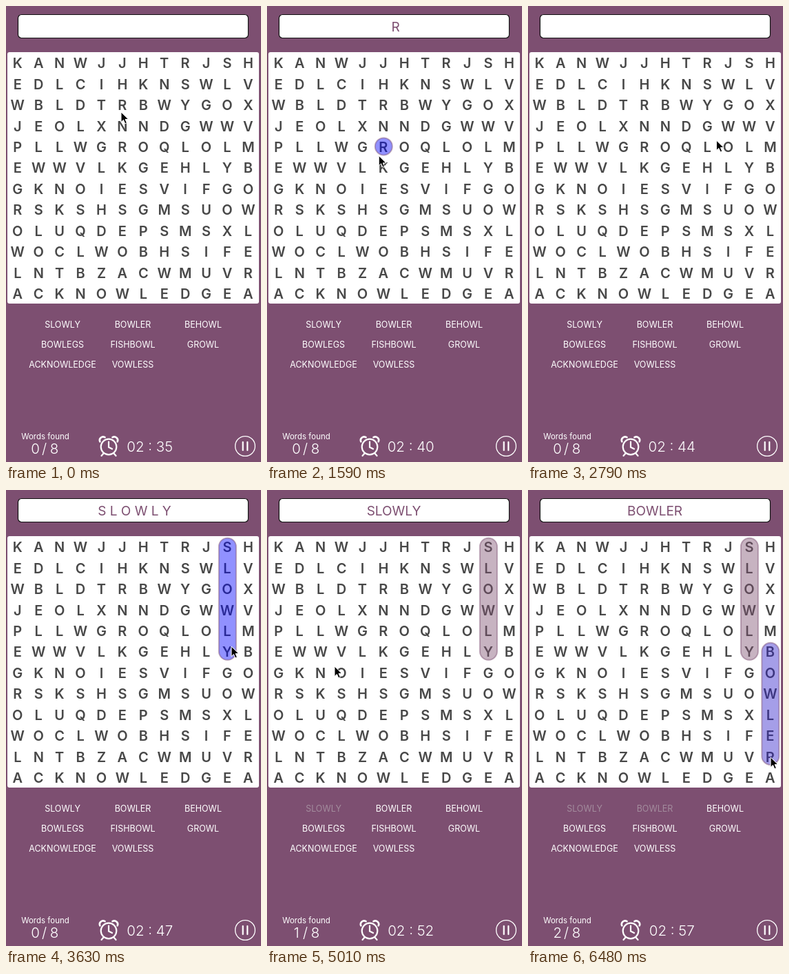
An HTML page that plays this animation: 370x662 px, repeating every 6510 ms.

```html
<!DOCTYPE html>
<html lang="en">
<head>
<meta charset="utf-8">
<title>Word search</title>
<style>
  html, body { margin: 0; width: 100%; height: 100%; overflow: hidden; background: #7d4f71; }
  svg { display: block; width: 370px; height: 662px; font-family: Inter, "Open Sans", sans-serif; }
  text { text-anchor: middle; fill: #fff; }
  #letters text { font-size: 20px; font-weight: 600; fill: #484848; }
  #typed { font-size: 19px; fill: #7d4f71; }
  #words text { font-size: 12.5px; }
  #words .found { fill: #a38c9d; }
  #pills rect { stroke: rgba(125, 79, 113, .45); stroke-width: 2; }
  .label { font-size: 11.5px; }
  .num { font-size: 20.5px; font-weight: 300; }
  .icon { fill: none; stroke: #fff; stroke-linecap: round; }
</style>
</head>
<body>
<svg viewBox="0 0 370 662">
  <rect width="370" height="662" fill="#7d4f71"/>
  <rect x="17.5" y="12.5" width="334" height="34" rx="5" fill="#fff" stroke="#111" stroke-width="1.2"/>
  <text id="typed" y="36.8"></text>
  <rect x="2" y="67" width="365" height="365" rx="3" fill="#fff"/>
  <g id="letters"></g>
  <g id="pills"></g>
  <g id="words"></g>
  <text class="label" x="57" y="629">Words found</text>
  <g class="num">
    <text id="score" x="42.7" y="650"></text>
    <text x="55.5" y="650">/</text>
    <text x="70" y="650">8</text>
    <text id="clock" x="208.7" y="647"></text>
  </g>
  <g class="icon" stroke-width="2.2">
    <circle cx="149" cy="640" r="11.3"/>
    <path d="M149 632.5V640.5L154 643M141.5 649.5L138.5 653M156.5 649.5L159.5 653"/>
    <path d="M136.3 632.5A5 5 0 0 1 143.5 626.2M161.7 632.5A5 5 0 0 0 154.5 626.2" stroke-width="2.6"/>
  </g>
  <g class="icon" stroke-width="1.3">
    <circle cx="347" cy="639" r="14.4"/>
    <path d="M343.7 633V645M350.3 633V645" stroke-width="2.2"/>
  </g>
  <path id="cursor" d="M0 0V14.6L3.4 11.4L5.8 16.8L8.3 15.7L6 10.5H10.7Z" fill="#000" stroke="#fff"/>
</svg>
<script>
const LOOP = 6510, STEP = 30, N = 12, CELL = 365 / N, FADE = 240;
const GRID = `KANWJJHTRJSH EDLCIHKNSWLV WBLDTRBWYGOX JEOLXNNDGWWV PLLWGROQLOLM EWWVLKGEHLYB
GKNOIESVIFGO RSKSHSGMSUOW OLUQDEPSMSXL WOCLWOBHSIFE LNTBZACWMUVR ACKNOWLEDGEA`.split(/\s+/);
const WORDS = 'SLOWLY BOWLER BEHOWL BOWLEGS FISHBOWL GROWL ACKNOWLEDGE VOWLESS'.split(' ');

// Pointer path: time, x, y
const PATH = [
  [0, 167, 154], [150, 169, 174], [380, 262, 178], [590, 262, 275], [840, 174, 374],
  [1060, 88, 262], [1230, 84, 180], [1330, 100, 174], [1530, 168, 204], [1760, 120, 250],
  [1960, 82, 200], [2070, 104, 136], [2190, 192, 121], [2340, 270, 140], [2480, 284, 205],
  [2640, 255, 240], [3060, 320, 84], [3180, 321, 83], [3630, 327, 227], [3700, 327, 231],
  [4380, 327, 231], [5010, 98, 256], [5520, 350, 236], [5640, 350, 238], [5790, 351, 305],
  [6330, 352, 387], [6510, 352, 388]
];
const DRAGS = [
  { from: 150, to: 1330, col: 5, row: 3 },
  { from: 1530, to: 2640, col: 5, row: 4 },
  { from: 3150, to: 3690, col: 10, row: 0, word: 'SLOWLY' },
  { from: 5580, to: 6390, col: 11, row: 5, word: 'BOWLER' }
];

const $ = id => document.getElementById(id);
const midX = c => 2 + (c + .5) * CELL;
const midY = r => 67 + (r + .5) * CELL;

function add(parent, tag, attrs, text = '') {
  const el = document.createElementNS('http://www.w3.org/2000/svg', tag);
  for (const k in attrs) el.setAttribute(k, attrs[k]);
  el.textContent = text;
  return parent.appendChild(el);
}

GRID.forEach((line, r) => [...line].forEach((ch, c) =>
  add($('letters'), 'text', { x: midX(c) - .4, y: midY(r) + 8.2 }, ch)));
const labels = WORDS.map((word, i) =>
  add($('words'), 'text', { x: 82 + i % 3 * 102, y: 467 + Math.floor(i / 3) * 29 }, word));
const pills = DRAGS.map(() => add($('pills'), 'rect', { height: 25, rx: 12.5, y: -12.5, x: -12.5 }));

// Monotone cubic interpolation along one axis
function along(axis, t) {
  let i = 0;
  while (i < PATH.length - 2 && t >= PATH[i + 1][0]) i++;
  const rate = k => PATH[k] && PATH[k + 1]
    ? (PATH[k + 1][axis] - PATH[k][axis]) / (PATH[k + 1][0] - PATH[k][0]) : 0;
  const slope = k => {
    const a = rate(k - 1), b = rate(k);
    return a * b > 0 ? 2 * a * b / (a + b) : 0;
  };
  const p = PATH[i], q = PATH[i + 1], h = q[0] - p[0], u = (t - p[0]) / h;
  const w = u * u * (3 - 2 * u);
  return p[axis] * (1 - w) + q[axis] * w
    + h * u * (1 - u) * (slope(i) * (1 - u) - slope(i + 1) * u);
}

// Snap a drag to one of eight directions
function select(d, t) {
  const end = Math.min(t, d.to);
  const dx = along(1, end) - midX(d.col), dy = along(2, end) - midY(d.row);
  const turn = Math.round(Math.atan2(dy, dx) / (Math.PI / 4));
  const sx = Math.round(Math.cos(turn * Math.PI / 4)), sy = Math.round(Math.sin(turn * Math.PI / 4));
  const want = Math.round(Math.max(Math.abs(dx), Math.abs(dy)) / CELL);
  let text = '', n = 0;
  for (; n <= want; n++) {
    const ch = (GRID[d.row + sy * n] || '')[d.col + sx * n];
    if (!ch) break;
    text += ch;
  }
  return { text, angle: turn * 45, length: (n - 1) * CELL * Math.hypot(sx, sy) };
}

function draw(t) {
  let typed = '', spaced = false, score = 0;
  DRAGS.forEach((d, i) => {
    const active = t >= d.from && t < d.to, found = d.word && t >= d.to;
    const pill = pills[i];
    pill.style.display = active || found ? '' : 'none';
    if (d.word) labels[WORDS.indexOf(d.word)].classList.toggle('found', found);
    if (t >= d.from) typed = '';
    if (found) { typed = d.word; spaced = false; score++; }
    if (!active && !found) return;
    const s = found ? { angle: 90, length: (d.word.length - 1) * CELL } : select(d, t);
    if (active) { typed = [...s.text].join('\u00a0'); spaced = true; }
    const k = found ? Math.min(1, (t - d.to) / FADE) : 0;
    pill.setAttribute('width', s.length + 25);
    pill.setAttribute('transform', `translate(${midX(d.col)} ${midY(d.row)}) rotate(${s.angle})`);
    pill.style.fill = `rgba(${125 * k}, ${79 * k}, ${255 - 142 * k}, .43)`;
  });
  $('typed').textContent = typed;
  $('typed').setAttribute('x', spaced ? 186.5 : 184);
  $('score').textContent = score;
  $('clock').textContent = '02 : ' + (35 + Math.floor((t + 120) / 300));
  $('cursor').setAttribute('transform', `translate(${along(1, t)} ${along(2, t)})`);
}

const start = performance.now();
function tick() {
  const t = (performance.now() - start) % LOOP;
  draw(Math.floor(t / STEP) * STEP);
  requestAnimationFrame(tick);
}
tick();
</script>
</body>
</html>
```
